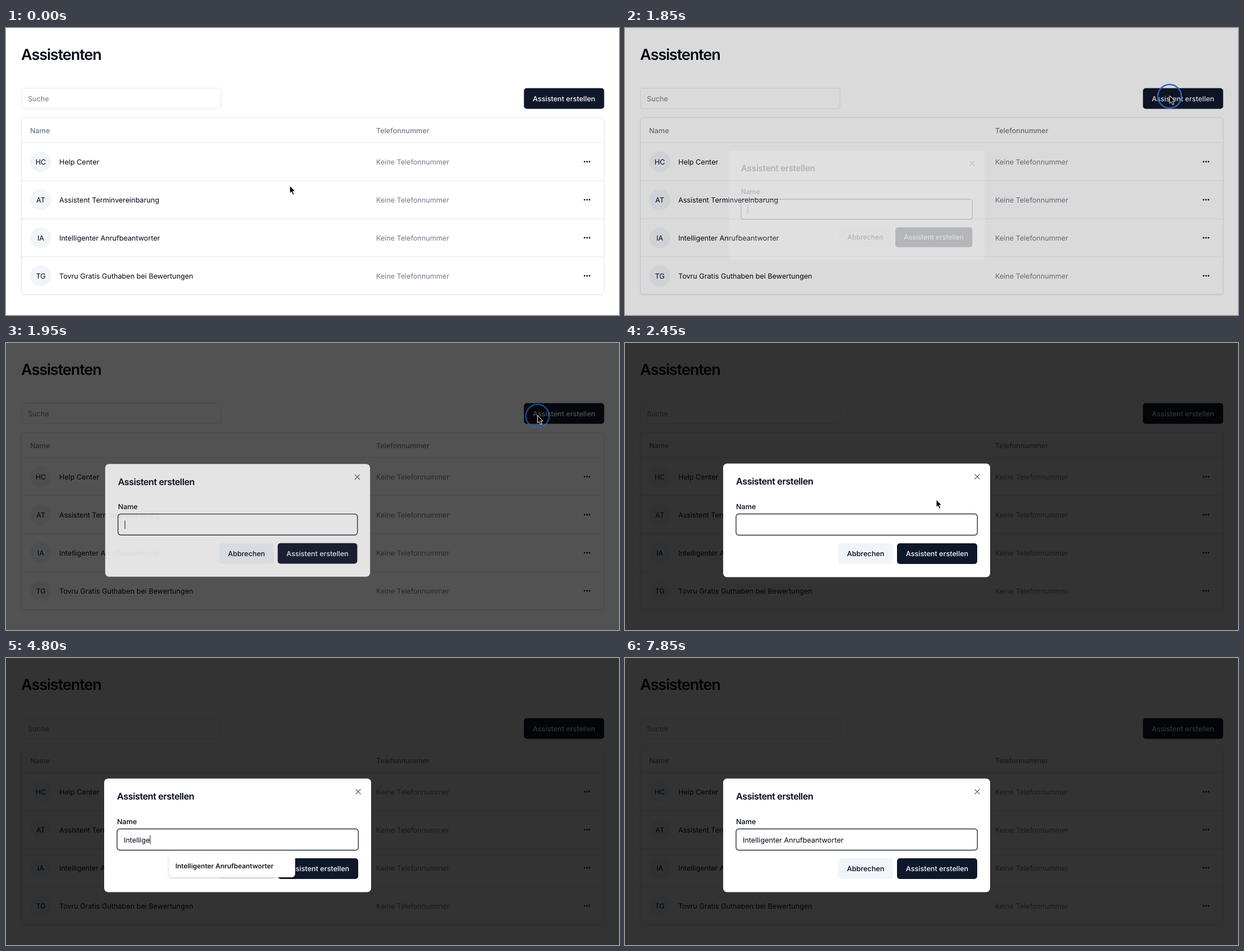
An HTML page for the animation above (8000 ms loop, 1093 by 513 pixels).

```html
<!DOCTYPE html>
<html lang="de">
<head>
<meta charset="utf-8">
<title>Assistenten</title>
<style>
  html, body { margin: 0; width: 100%; height: 100%; overflow: hidden; background: #fff; }
  svg { display: block; width: 100%; height: 100%; }
  text {
    font: 400 12.63px Inter, "Liberation Sans", sans-serif;
    font-optical-sizing: none;
    text-rendering: geometricPrecision;
    white-space: pre;
    fill: #020817;
  }
  .medium { font-weight: 500; }
  .muted { fill: #717a8a; }
  .light { fill: #f8fafc; }
  .mid { text-anchor: middle; }
  .h1 { font-size: 27.06px; font-weight: 600; letter-spacing: -1.1px; }
  .h2 { font-size: 16.24px; font-weight: 600; letter-spacing: -.43px; }
  .option { font-size: 11.9px; font-weight: 600; fill: #1b1b1d; }
  .line { fill: none; stroke: #e4e7ec; }
  .dark { fill: #0f172a; }
  .soft { fill: #f1f4f9; }
  #card { fill: #fff; stroke: #e2e5ea; filter: drop-shadow(0 1px 1px rgba(0, 0, 0, .08)); }
  #menuBox { fill: #fff; filter: drop-shadow(0 1px 1.5px rgba(0, 0, 0, .25)); }
</style>
</head>
<body>
<svg id="stage" viewBox="0 0 1093 513">
  <rect width="1093" height="513" fill="#fff"/>
  <g id="page">
    <rect class="line" x="27.5" y="107.5" width="356" height="36.5" rx="5"/>
    <rect class="dark" x="923.5" y="107.5" width="143" height="37" rx="5"/>
    <rect id="card" x="27.5" y="160" width="1039" height="316" rx="5"/>
  </g>
  <rect id="shade" width="1093" height="513"/>
  <g id="dialog">
    <rect x="175" y="215.5" width="476" height="203" rx="7" fill="#fff"/>
    <path d="M623.8 234.8l8.4 8.4m0-8.4l-8.4 8.4" stroke="#4b505a" stroke-width="1.2" stroke-linecap="round"/>
    <rect x="198" y="305.5" width="430.3" height="38" rx="5" fill="#fff" stroke="#252d3f" stroke-width="1.4"/>
    <rect class="soft" x="380.5" y="358" width="97.5" height="37" rx="5"/>
    <rect class="dark" x="485" y="358" width="143" height="37" rx="5"/>
    <rect id="caret" y="317" width="1.1" height="15.5" fill="#222"/>
  </g>
  <g id="menu">
    <rect id="menuBox" x="290" y="350" width="225.5" rx="6"/>
  </g>
  <circle id="ring" fill="none" stroke="#2a64b8" stroke-width="2.5"/>
  <path id="arrow" d="M0 0V13.6L3 10.8L5.4 16.2L7.8 15.2L5.4 9.9H9.6Z" fill="#000" stroke="#fff" stroke-width="1"/>
  <path id="beam" d="M-2.5 -8Q0 -8 0 -6Q0 -8 2.5 -8M0 -6V6M-2.5 8Q0 8 0 6Q0 8 2.5 8" fill="none" stroke="#111" stroke-width="1.1"/>
</svg>
<script>
const LOOP = 8000, STEP = 50;
const $ = id => document.getElementById(id);
const page = $('page'), dialog = $('dialog'), menu = $('menu'), caret = $('caret');

function add(parent, tag, attrs) {
  const el = document.createElementNS('http://www.w3.org/2000/svg', tag);
  set(el, attrs);
  parent.append(el);
  return el;
}
function set(el, attrs) {
  for (const key in attrs) el.setAttribute(key, attrs[key]);
}
// y is the middle of the capitals
function label(parent, x, y, str, cls = '', size = 12.63) {
  const el = add(parent, 'text', { x, y: y + size * .364, class: cls });
  el.textContent = str;
  return el;
}

label(page, 27, 47, 'Assistenten', 'h1', 27.06);
label(page, 39, 126.5, 'Suche', 'muted');
label(page, 995, 126, 'Assistent erstellen', 'medium light mid');
label(page, 43, 183, 'Name', 'medium muted');
label(page, 660, 183, 'Telefonnummer', 'medium muted');

const rows = [
  ['HC', 'Help Center'],
  ['AT', 'Assistent Terminvereinbarung'],
  ['IA', 'Intelligenter Anrufbeantworter'],
  ['TG', 'Tovru Gratis Guthaben bei Bewertungen']
];
rows.forEach(([initials, name], i) => {
  const y = 239 + i * 68;
  add(page, 'path', { d: `M28 ${y - 34}H1066`, class: 'line' });
  add(page, 'circle', { cx: 62, cy: y, r: 18.6, class: 'soft' });
  label(page, 62, y, initials, 'mid');
  label(page, 95, y, name);
  label(page, 660, y, 'Keine Telefonnummer', 'muted');
  for (const dx of [-4.4, 0, 4.4]) add(page, 'circle', { cx: 1036 + dx, cy: y, r: 1.4, fill: '#020817' });
});

label(dialog, 198, 247.5, 'Assistent erstellen', 'h2', 16.24);
label(dialog, 198, 292, 'Name', 'medium');
label(dialog, 429, 376.5, 'Abbrechen', 'medium mid');
label(dialog, 556.5, 376.5, 'Assistent erstellen', 'medium light mid');
const input = label(dialog, 210, 325, '');

const PHRASE = 'Intelligenter Anrufbeantworter';
const options = [
  'IKUVANE persönliche Assist...',
  'Ingenieurbüro Pelm',
  'IT-KurzFragen',
  'IRVELO QUM Telefonhilfe na...',
  'INKAS REIME',
  PHRASE
].map(str => ({ str, el: label(menu, 302, 0, str, 'option') }));

// Time of each key press
const keys = [
  3700, 3850, 3950, 4050, 4200, 4400, 4500, 4600, 4800, 4900,
  5000, 5100, 5250, 5350, 5450, 5550, 5750, 5800, 5850, 5950,
  6000, 6100, 6300, 6700, 6800, 6850, 6950, 7050, 7100, 7250
];

const clamp = x => Math.min(1, Math.max(0, x));
const ramp = (t, from, to) => clamp((t - from) / (to - from));
const linear = x => x;
const easeOut = x => 1 - (1 - x) ** 3;
const easeInOut = x => x * x * (3 - 2 * x);

// time, x, y, easing of the move that ends there
const pointerPath = [
  [0, 506, 282],
  [850, 957, 119, easeInOut],
  [1100, 957, 119, linear],
  [1400, 971, 121, easeInOut],
  [1900, 971, 121, linear],
  [2300, 430, 317, easeInOut],
  [2350, 430, 317, linear],
  [2450, 555, 280, linear],
  [2650, 594, 275, easeOut]
];

function pointerAt(t) {
  const i = pointerPath.findIndex(p => p[0] > t);
  if (i < 0) return pointerPath.at(-1).slice(1, 3);
  const [t0, x0, y0] = pointerPath[i - 1];
  const [t1, x1, y1, ease] = pointerPath[i];
  const k = ease(ramp(t, t0, t1));
  return [x0 + (x1 - x0) * k, y0 + (y1 - y0) * k];
}

function drawPointer(t) {
  const [x, y] = pointerAt(t);
  const inInput = t > 2000 && x > 198 && x < 628 && y > 305 && y < 343;
  const shown = t < 3700;
  set($('arrow'), { transform: `translate(${x} ${y})`, opacity: +(shown && !inInput) });
  set($('beam'), { transform: `translate(${x} ${y + 8})`, opacity: +(shown && inInput) });
  const glow = ramp(t, 1000, 1180) * (1 - ramp(t, 1920, 2020));
  set($('ring'), { cx: x, cy: y + 1, r: 20 + glow, opacity: glow });
}

function drawDialog(t) {
  const p = easeOut(ramp(t, 1834, 2084));
  set($('shade'), { opacity: .8 * p });
  set(dialog, {
    opacity: p,
    transform: `translate(413 317) scale(${.95 + .05 * p}) translate(-413 -317)`
  });
}

function drawTyping(t) {
  const count = keys.filter(k => k <= t).length;
  const typed = PHRASE.slice(0, count);
  input.textContent = typed;
  const since = t - (count ? keys[count - 1] : 1900);
  const width = count ? input.getComputedTextLength() : 0;
  set(caret, { x: 210 + width, opacity: +(since % 1000 < 500) });

  const open = count > 0 && count < PHRASE.length;
  let n = 0;
  for (const { str, el } of options) {
    const match = str.toLowerCase().startsWith(typed.toLowerCase());
    set(el, { opacity: +match, y: 376.1 + n * 33.5 });
    if (match) n++;
  }
  set($('menuBox'), { height: 8.5 + n * 33.5 });
  menu.style.display = open ? '' : 'none';
}

const start = performance.now();
function frame() {
  const t = Math.floor((performance.now() - start) % LOOP / STEP) * STEP;
  drawPointer(t);
  drawDialog(t);
  drawTyping(t);
  requestAnimationFrame(frame);
}
frame();
</script>
</body>
</html>
```
